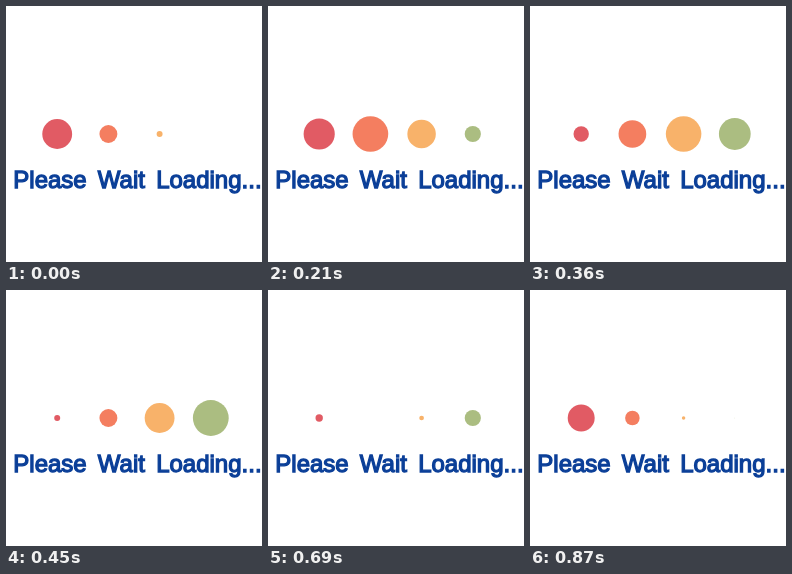
An HTML page for the animation above (900 ms loop, 256x256 px).

```html
<!DOCTYPE html>
<html lang="en">
<head>
<meta charset="utf-8">
<title>Loading</title>
<style>
  html, body { margin: 0; height: 100%; overflow: hidden; background: #fff; }
  svg { display: block; width: 100vw; height: 100vh; }
  text {
    font: 24px "Liberation Sans", Arial, sans-serif;
    word-spacing: 4.5px;
    fill: #0b3f98;
    stroke: #0b3f98;
    stroke-width: 1.3px;
  }
</style>
</head>
<body>
<svg viewBox="0 0 256 256">
  <g id="dots"></g>
  <text x="7.3" y="182">Please Wait Loading...</text>
</svg>
<script>
const LOOP = 900, STEP = 30, MAX_RADIUS = 17.92;
const colors = ["#e15b64", "#f47e60", "#f8b26a", "#abbd81"];

const dots = colors.map((color, i) => {
  const dot = document.createElementNS("http://www.w3.org/2000/svg", "circle");
  dot.setAttribute("cx", 51.2 * (i + 1));
  dot.setAttribute("cy", 128);
  dot.setAttribute("fill", color);
  document.getElementById("dots").append(dot);
  return dot;
});

// cubic-bezier(0.3, 0, 0.7, 1), solved by bisection
function ease(x) {
  let low = 0, high = 1, t;
  for (let i = 0; i < 24; i++) {
    t = (low + high) / 2;
    const s = 1 - t;
    if (0.9 * t * s * s + 2.1 * t * t * s + t ** 3 < x) low = t;
    else high = t;
  }
  return t * t * (3 - 2 * t);
}

const start = performance.now();

function draw() {
  const elapsed = Math.max(0, performance.now() - start) % LOOP;
  const time = Math.floor(elapsed / STEP) * STEP / LOOP;
  dots.forEach((dot, i) => {
    const phase = (time + (3 - i) / 8) % 1;
    dot.setAttribute("r", MAX_RADIUS * ease(1 - Math.abs(2 * phase - 1)));
  });
  requestAnimationFrame(draw);
}
draw();
</script>
</body>
</html>
```
